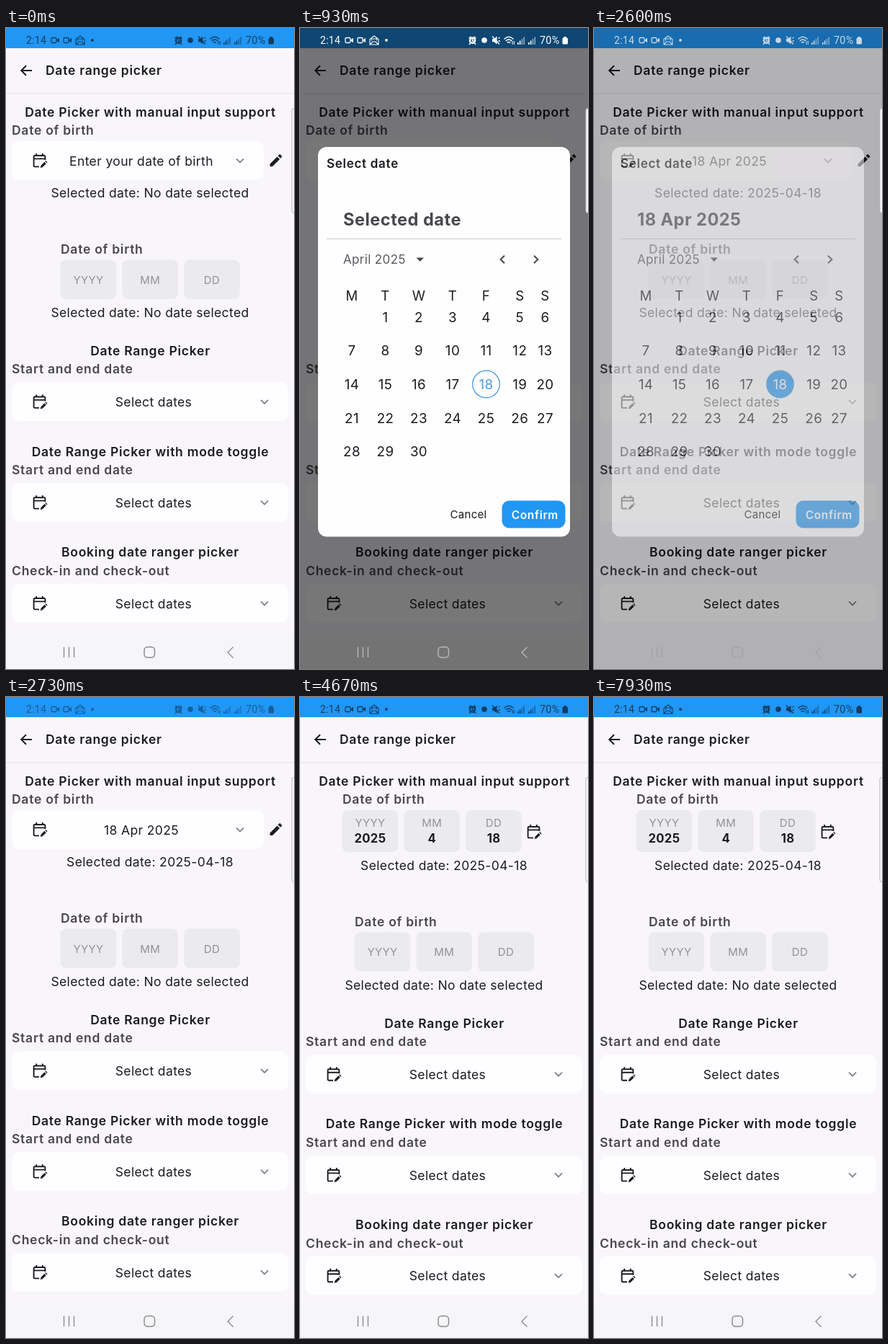
An HTML page for the animation above (8000 ms loop, 400 by 889 pixels).

```html
<!DOCTYPE html>
<html lang="en">
<head>
<meta charset="utf-8">
<title>Date range picker</title>
<style>
  html, body { margin: 0; width: 100%; height: 100%; overflow: hidden; background: #f8f6fa; }
  svg { display: block; width: 100vw; height: 100vh; }
  text { font-family: Inter, "Open Sans", sans-serif; letter-spacing: .021em; }
  .semi { font-weight: 600; letter-spacing: .042em; }
  .bold { font-weight: 700; letter-spacing: .02em; }
  .clock { font-family: Roboto, sans-serif; letter-spacing: .02em; }
</style>
</head>
<body>
<svg id="stage" viewBox="0 0 400 889" preserveAspectRatio="none"></svg>
<script>
const LOOP = 8000;
const BLUE = '#2196f3', INK = '#1c1b1f', LABEL = '#49474c', HINT = '#939196', BOX = '#ebeaed';
const stage = document.getElementById('stage');

function add(parent, tag, attrs = {}, content) {
  const node = document.createElementNS('http://www.w3.org/2000/svg', tag);
  for (const key in attrs) node.setAttribute(key, attrs[key]);
  if (content !== undefined) node.textContent = content;
  return parent.appendChild(node);
}
const group = (parent, attrs) => add(parent, 'g', attrs);
const at = (parent, x, y) => group(parent, { transform: `translate(${x} ${y})` });
const rect = (parent, x, y, width, height, rx, fill) =>
  add(parent, 'rect', { x, y, width, height, rx, fill });
const line = (parent, d, color, width = 1.8) =>
  add(parent, 'path', { d, fill: 'none', stroke: color, 'stroke-width': width });

// y is the middle of the capital letters
function text(parent, content, x, y, { size = 17.5, style = '', fill = INK, anchor = 'middle' } = {}) {
  return add(parent, 'text', {
    x, y: y + size * .36, 'font-size': size, class: style, fill, 'text-anchor': anchor
  }, content);
}
const heading = (parent, content, y) => text(parent, content, 200.5, y, { style: 'semi' });
const label = (parent, content, x, y) =>
  text(parent, content, x, y, { style: 'semi', fill: LABEL, anchor: 'start' });

function calendarIcon(parent, x, y) {
  const g = at(parent, x, y);
  line(g, 'M-1 8.4H-7A1.4 1.4 0 0 1-8.4 7V-5.6A1.4 1.4 0 0 1-7-7H6A1.4 1.4 0 0 1 7.4-5.6V-1M-8.4-2.6H7.4', INK, 1.9);
  line(g, 'M-4.8-10V-6.4M3.8-10V-6.4', INK, 2);
  line(g, 'M2.4 8.2L7.6 3', INK, 3.2);
  line(g, 'M8.4 2.2L9.4 1.2', INK, 3.2);
  add(g, 'path', { d: 'M1.2 7L.8 9.8L3.6 9.4Z', fill: INK });
}
function pencilIcon(parent, x, y) {
  const g = at(parent, x, y);
  add(g, 'path', { d: 'M-8.4 4.9L1.6-5.1L5.1-1.6L-4.9 8.4H-8.4Z', fill: INK });
  add(g, 'path', { d: 'M2.7-6.2L4.5-8Q5.3-8.8 6.1-8L8-6.1Q8.8-5.3 8-4.5L6.2-2.7Z', fill: INK });
}
const downArrow = (parent, x, y) =>
  line(parent, `M${x - 5} ${y - 2.6}l5 5l5-5`, '#858388', 1.9);

function pickerCard(parent, y, width, content) {
  rect(parent, 8, y, width, 53.5, 10, '#fefdff');
  calendarIcon(parent, 47, y + 27);
  downArrow(parent, width - 25, y + 27);
  return text(parent, content, 13 + width / 2, y + 27.4);
}
function inputBoxes(parent, x, y, height, values) {
  ['YYYY', 'MM', 'DD'].forEach((hint, i) => {
    const left = x + i * 85.8, mid = left + 38.8;
    rect(parent, left, y, 77.6, height, 8, BOX);
    text(parent, hint, mid, y + (values ? 17.4 : 27.6), { size: 15, fill: HINT });
    if (values) text(parent, values[i], mid, y + 39.4, { size: 16.7, style: 'bold' });
  });
}

// Page
rect(stage, 0, 0, 400, 889, 0, '#f8f6fa');
rect(stage, 0, 0, 400, 28, 0, BLUE);
line(stage, 'M36 59H21.5M28 52.2L21.2 59L28 65.8', INK, 2);
text(stage, 'Date range picker', 55, 59, { style: 'semi', anchor: 'start' });
rect(stage, 0, 90.5, 400, 1, 0, '#e3e1e6');
heading(stage, 'Date Picker with manual input support', 117);

const pickMode = group(stage);
label(pickMode, 'Date of birth', 8, 142);
const birthDate = pickerCard(pickMode, 157, 350, '');
pencilIcon(pickMode, 375, 183.5);
const chosen = text(pickMode, '', 200, 229);

const typeMode = group(stage);
label(typeMode, 'Date of birth', 59, 142);
inputBoxes(typeMode, 58.6, 157, 58, ['2025', '4', '18']);
calendarIcon(typeMode, 325, 187);
text(typeMode, 'Selected date: 2025-04-18', 200, 234);

const lower = group(stage);
label(lower, 'Date of birth', 76, 307);
inputBoxes(lower, 75.6, 321.5, 54.5);
text(lower, 'Selected date: No date selected', 200, 395);
[
  ['Date Range Picker', 'Start and end date', 447.5],
  ['Date Range Picker with mode toggle', 'Start and end date', 587.2],
  ['Booking date ranger picker', 'Check-in and check-out', 727]
].forEach(([title, name, y]) => {
  heading(lower, title, y);
  label(lower, name, 8, y + 25.5);
  pickerCard(lower, y + 44, 384, 'Select dates');
});
rect(stage, 0, 843, 400, 46, 0, '#f6f5f8');

// Dialog, with the edge handle above its shade
const scrim = rect(stage, 0, 0, 400, 889, 0, '#000');
add(stage, 'rect', { x: 397, y: 111.5, width: 8, height: 145, rx: 3, fill: '#f8f6fa', stroke: '#b5b3b7' });
const dialog = group(stage);
rect(dialog, 25, 165, 350, 540.5, 12, '#fffeff');
text(dialog, 'Select date', 37, 187.5, { size: 17, style: 'semi', anchor: 'start' });
const headline = text(dialog, '', 60, 266, { size: 23.6, style: 'bold', fill: LABEL, anchor: 'start' });
rect(dialog, 37, 292, 326, 1, 0, '#c9c7cb');
text(dialog, 'April 2025', 60, 321, { size: 17, fill: '#5b595e', anchor: 'start' });
add(dialog, 'path', { d: 'M161.5 318.5h10.5l-5.2 5.4z', fill: LABEL });
line(dialog, 'M284 315.8l-5.4 5.2l5.4 5.2M325 315.8l5.4 5.2l-5.4 5.2', LABEL, 2);

const columns = [72, 118.5, 165, 212, 258.5, 305.3, 340.5];
const ring = add(dialog, 'circle', { cx: 258.5, cy: 494, r: 18.8, stroke: '#3a94dc', 'stroke-width': 1.2 });
[...'MTWTFSS'].forEach((day, i) => text(dialog, day, columns[i], 371.5, { size: 18.5 }));
let today;
for (let day = 1; day <= 30; day++) {
  const row = Math.floor(day / 7);
  const cell = text(dialog, day, columns[day % 7], 401 + row * 46.65, { size: 18.8 });
  if (day === 18) today = cell;
}
text(dialog, 'Cancel', 234, 675, { size: 15 });
rect(dialog, 280.5, 655.5, 88, 38, 10, BLUE);
text(dialog, 'Confirm', 326.3, 675, { size: 15.5, style: 'semi', fill: '#fff' });

// Status bar
const status = group(stage);
const ink = 'currentColor';
text(status, '2:14', 28, 17, { size: 14, style: 'clock', fill: ink, anchor: 'start' });
[63, 80].forEach(x => {
  add(status, 'rect', { x, y: 13.5, width: 7, height: 7, rx: 1.5, fill: 'none', stroke: ink, 'stroke-width': 1.3 });
  add(status, 'path', { d: `M${x + 7.5} 16.2l3.5-2.4v6.4l-3.5-2.4z`, fill: ink });
});
line(status, 'M97 15.5L103 11L109 15.5V23H97ZM97.5 22.5L101 19H105L108.5 22.5M99.5 17.5V15H106.5V17.5', ink, 1.1);
add(status, 'circle', { cx: 120, cy: 17, r: 1.9, fill: ink });
add(status, 'circle', { cx: 239.5, cy: 17.3, r: 3.6, fill: 'none', stroke: ink, 'stroke-width': 2.4 });
line(status, 'M234.5 14.5l3-2.6M244.5 14.5l-3-2.6M239.5 15v3h2M236.5 21l-1.5 2M242.5 21l1.5 2', ink, 1.5);
add(status, 'circle', { cx: 256, cy: 17, r: 3.8, fill: ink });
add(status, 'path', { d: 'M267 15h2.5l4-3.4v11l-4-3.4h-2.5z', fill: ink });
line(status, 'M267 11.5l10 11M275.5 14.5l2-1.5M275.5 18h2.5', ink, 1.3);
line(status, 'M283.5 15.5Q290 9 296.5 15.5M285.8 18Q290 14 294.2 18M288 20.4Q290 18.6 292 20.4', ink, 1.5);
line(status, 'M295 18v5M297.3 18v5', ink, 1);
[302, 317].forEach(x => {
  for (let i = 0; i < 4; i++)
    add(status, 'rect', { x: x + i * 2.8, y: 20 - i * 2.5, width: 1.6, height: 3 + i * 2.5, fill: ink, opacity: i < 2 ? 1 : .55 });
});
text(status, '70%', 333, 17, { size: 14.3, style: 'clock', fill: ink, anchor: 'start' });
rect(status, 364.5, 13.5, 7.5, 9, 1.5, ink);
rect(status, 366.5, 12, 3.5, 2, .5, ink);

// Navigation bar
const nav = group(stage);
line(nav, 'M80.5 858.5V873M87.5 858.5V873M94.5 858.5V873M315.5 858.5L308 866L315.5 873.5', ink, 1.4);
add(nav, 'rect', { x: 192, y: 858.5, width: 14.5, height: 14.5, rx: 4.5, fill: 'none', stroke: ink, 'stroke-width': 1.5 });

// Motion
const DARK = [17, 62, 100], DIM = [21, 94, 158], WHITE = [255, 255, 255];
const ramp = (t, from, to) => Math.min(1, Math.max(0, (t - from) / (to - from)));
const mix = (a, b, k) => a.map((v, i) => v + (b[i] - v) * k);
const rgb = c => `rgb(${c.map(Math.round)})`;
const show = (node, on) => node.setAttribute('display', on ? 'inline' : 'none');

function draw(t) {
  const open = ramp(t, 70, 290) * (1 - ramp(t, 2500, 2715));
  const picked = t >= 1300, confirmed = t >= 2500;
  const typing = (t >= 4000 && t < 6530) || t >= 7670;

  scrim.setAttribute('opacity', .53 * open);
  dialog.setAttribute('opacity', open);
  show(dialog, open > 0);
  headline.textContent = picked ? '18 Apr 2025' : 'Selected date';
  ring.setAttribute('fill', picked ? BLUE : 'none');
  today.setAttribute('fill', picked ? '#fff' : '#4a9fe0');

  birthDate.textContent = confirmed ? '18 Apr 2025' : 'Enter your date of birth';
  chosen.textContent = 'Selected date: ' + (confirmed ? '2025-04-18' : 'No date selected');
  show(pickMode, !typing);
  show(typeMode, typing);
  lower.setAttribute('transform', `translate(0 ${typing ? 4.8 : 0})`);

  const tint = t < 2500
    ? mix(DARK, WHITE, ramp(t, 70, 290))
    : mix(mix(WHITE, DIM, ramp(t, 2560, 2730)), DARK, ramp(t, 2740, 2870));
  status.style.color = rgb(tint);
  nav.style.color = rgb(mix([141, 139, 144], [184, 182, 186], open));
}

const start = performance.now();
function tick() {
  draw((performance.now() - start) % LOOP);
  requestAnimationFrame(tick);
}
tick();
</script>
</body>
</html>
```
